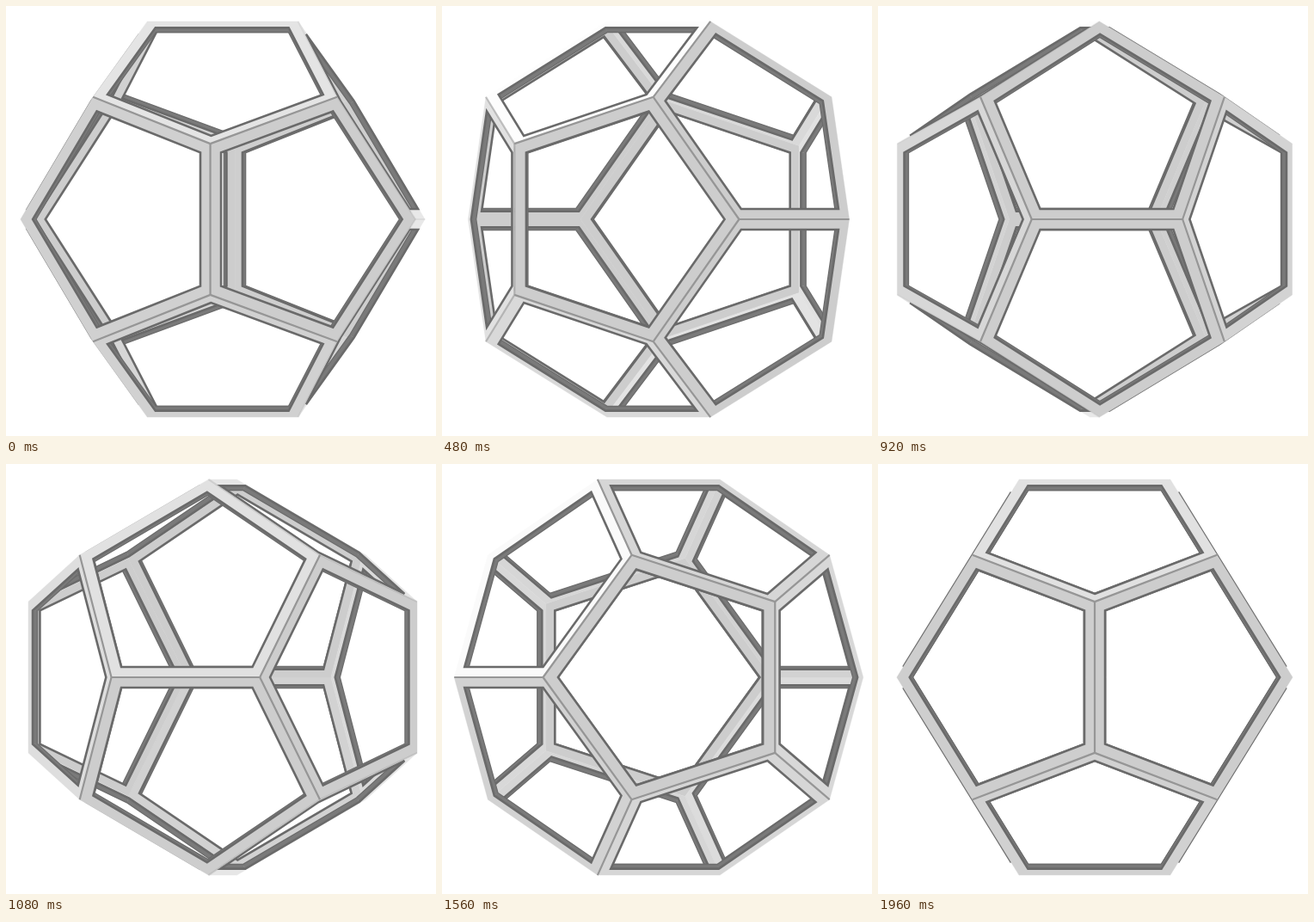
An HTML page that plays this animation: 500 px wide and 500 px high, repeating every 2 s.

```html
<!DOCTYPE html>
<html lang="en">
<head>
<meta charset="utf-8">
<title>Turning dodecahedron frame</title>
<style>
html, body { margin: 0; width: 100%; height: 100%; overflow: hidden; background: #fff; }
svg { display: block; width: 100vw; height: 100vh; }
</style>
</head>
<body>
<svg id="stage" viewBox="0 0 500 500" stroke-linejoin="miter"></svg>
<script>
const PHI = (1 + Math.sqrt(5)) / 2;
const SCALE = 142.2, CX = 252, CY = 248;
const HOLE = 0.883;   // size of the opening in each face
const DEPTH = 0.037;  // thickness of the shell
const STEP_MS = 40, STEPS = 50;
const WALL = '#7a7a7a', RIM = '#6a6a6a', RIDGE = '#969696';

const add = (a, b, k = 1) => a.map((v, i) => v + k * b[i]);
const mul = (a, k) => a.map(v => v * k);
const dot = (a, b) => a[0] * b[0] + a[1] * b[1] + a[2] * b[2];
const cross = (a, b) => [0, 1, 2].map(i =>
  a[(i + 1) % 3] * b[(i + 2) % 3] - a[(i + 2) % 3] * b[(i + 1) % 3]);
const unit = a => mul(a, 1 / Math.hypot(...a));
const clamp = v => Math.max(0, Math.min(1, v));
const HIGHLIGHT = unit([-0.6, 0.65, 0.45]);

const signs = [-1, 1];
const vertices = [], normals = [];
for (const a of signs) for (const b of signs) {
  const p = a / PHI, q = b * PHI;
  vertices.push([0, p, q], [p, q, 0], [q, 0, p]);
  normals.push([a, 0, q], [0, q, a], [q, a, 0]);
  for (const c of signs) vertices.push([a, b, c]);
}

const faces = normals.map(direction => {
  const n = unit(direction);
  const ids = vertices.map((_, i) => i).filter(i => dot(vertices[i], direction) > 2.6);
  const center = mul(ids.reduce((sum, i) => add(sum, vertices[i]), [0, 0, 0]), 1 / 5);
  const u = add(vertices[ids[0]], center, -1), w = cross(n, u);
  const angle = i => {
    const d = add(vertices[i], center, -1);
    return Math.atan2(dot(d, w), dot(d, u));
  };
  ids.sort((i, j) => angle(i) - angle(j));
  const outer = ids.map(i => vertices[i]);
  const hole = outer.map(v => add(mul(center, 1 - HOLE), v, HOLE));
  const shrink = 1 - DEPTH / dot(center, n);
  return {
    n, ids, center, outer, hole,
    inner: outer.map(v => mul(v, shrink)),
    innerHole: hole.map(v => add(v, n, -DEPTH))
  };
});

// Each edge joins the two faces that share its end points.
const edges = [];
faces.forEach((f, i) => faces.slice(i + 1).forEach(g => {
  const shared = f.ids.filter(id => g.ids.includes(id));
  if (shared.length === 2) edges.push({ f, g, ends: shared.map(id => vertices[id]) });
}));

const shade = (n, gloss) => {
  const v = Math.round(205 + gloss * clamp((dot(n, HIGHLIGHT) - 0.7) / 0.24)
    + 30 * clamp((0.6 - n[2]) / 0.6));
  return `rgb(${[v, v, v].map(c => Math.min(c, 253))})`;
};

function render(step) {
  const theta = (step + 1) * Math.PI / STEPS;
  const cos = Math.cos(theta), sin = Math.sin(theta);
  const turn = ([x, y, z]) => [x * cos - z * sin, y, z * cos + x * sin];
  const project = p => {
    const [x, y] = turn(p);
    return (CX + x * SCALE).toFixed(2) + ' ' + (CY - y * SCALE).toFixed(2);
  };
  const loop = points => 'M' + points.map(project).join('L') + 'Z';
  const shape = (d, fill, stroke = fill, width = 0.4, opacity = 1) =>
    `<path d="${d}" fill="${fill}" fill-rule="evenodd" stroke="${stroke}" stroke-width="${width}" opacity="${opacity}"/>`;
  const rim = points => shape(loop(points), 'none', RIM, 2.6);
  const ring = (border, hole, fill) => shape(loop(border) + loop(hole), fill);

  const walls = f => f.hole.map((a, i) => {
    const j = (i + 1) % 5, b = f.hole[j];
    const inward = turn(add(f.center, mul(add(a, b), 0.5), -1));
    return inward[2] > 0 ? shape(loop([a, b, f.innerHole[j], f.innerHole[i]]), WALL) : '';
  }).join('');

  const drawFace = ({ f, n }) => n[2] > 0
    ? rim(f.innerHole) + walls(f) + ring(f.outer, f.hole, shade(n, 40)) + rim(f.hole)
    : rim(f.hole) + walls(f) + ring(f.inner, f.innerHole, shade(mul(n, -1), 10)) + rim(f.innerHole);

  const ridges = edges.map(({ f, g, ends }) => {
    const facing = Math.min(turn(f.n)[2], turn(g.n)[2]);
    return facing > 0 ? shape(loop(ends), 'none', RIDGE, 2.2, clamp(facing / 0.35)) : '';
  });

  document.getElementById('stage').innerHTML = faces
    .map(f => ({ f, n: turn(f.n) }))
    .sort((a, b) => a.n[2] - b.n[2])
    .map(drawFace).join('') + ridges.join('');
}

let shown = -1;
function tick() {
  const step = Math.floor(performance.now() / STEP_MS) % STEPS;
  if (step !== shown) render(shown = step);
  requestAnimationFrame(tick);
}
tick();
</script>
</body>
</html>
```
